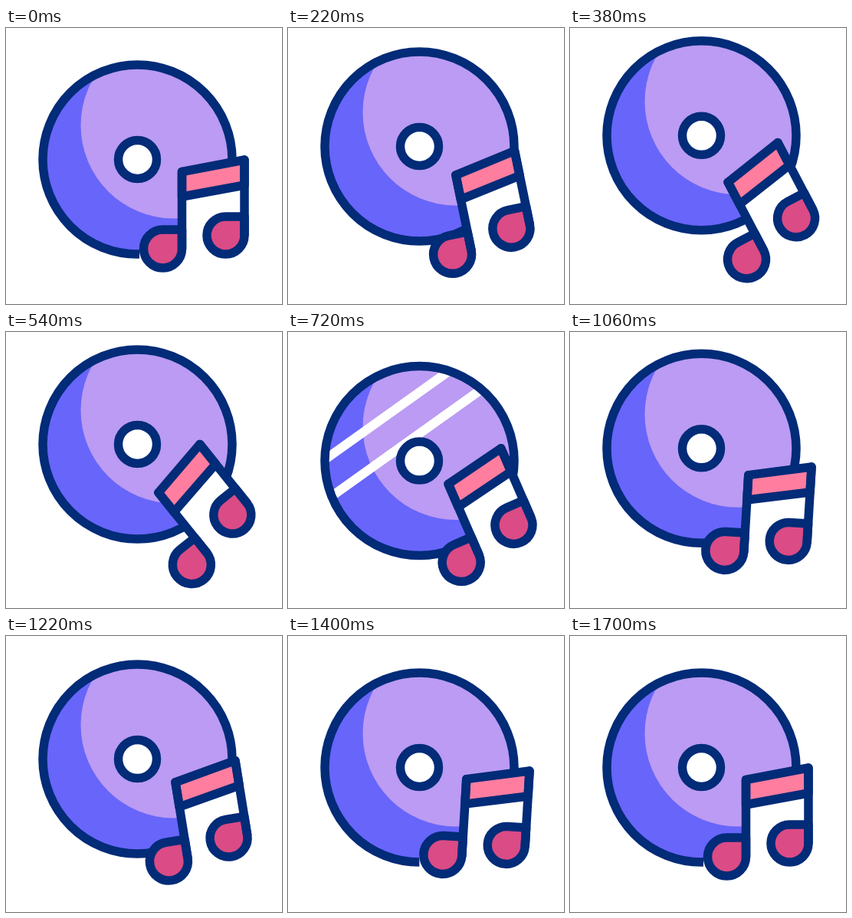
An HTML page that plays this animation: 360 px wide and 360 px high, repeating every 2 s.

```html
<!DOCTYPE html>
<html lang="en">
<head>
<meta charset="utf-8">
<title>Disc and note</title>
<style>
  html, body { margin: 0; width: 100%; height: 100%; overflow: hidden; background: #fff; }
  svg { display: block; width: 100%; height: 100%; }
  .line { stroke: #022b78; stroke-width: 11.5; stroke-linejoin: round; stroke-linecap: round; }
  .beam { fill: #ff7d9f; }
  .head { fill: #db4b85; }
</style>
</head>
<body>
<svg viewBox="0 0 360 360">
  <defs>
    <clipPath id="face"><circle cx="171.5" cy="171.5" r="123.5"/></clipPath>
  </defs>

  <g id="disc">
    <g clip-path="url(#face)">
      <circle cx="171.5" cy="171.5" r="124" fill="#6865fa"/>
      <circle cx="219" cy="127" r="121.5" fill="#bb9bf3"/>
      <g transform="translate(171.5 171.5) rotate(-35.5)">
        <g id="shine" fill="#fff">
          <rect x="-140" y="-28" width="280" height="12"/>
          <rect x="-140" y="16" width="280" height="12"/>
        </g>
      </g>
    </g>
    <circle class="line" cx="171.5" cy="171.5" r="123.5" fill="none"/>
    <circle class="line" cx="171.5" cy="171.5" r="25" fill="#fff"/>
  </g>

  <!-- white areas where the note cuts into the disc -->
  <rect id="notch" width="70" height="40" fill="#fff"/>

  <g id="note">
    <path d="M229.5 220L311 205V320H229.5Z" fill="#fff"/>
    <path class="line head" d="M229.5 263H204.5A25 25 0 1 0 229.5 288Z"/>
    <path class="line head" d="M311 246H286.5A24.5 24.5 0 1 0 311 270.5Z"/>
    <path class="line beam" d="M229.5 187.5L311 172V205L229.5 220Z"/>
    <path class="line" d="M229.5 187.5V288M311 172V270" fill="none"/>
  </g>
</svg>
<script>
  const LOOP = 2000;
  const PIVOT = { x: 245.5, y: 242 };
  const HEAD = { x: 204.5, y: 288, r: 30.5 };

  // [time in ms, value]
  const lift = [[0, 0], [425, -32], [800, 0], [1085, -20], [1375, 0]];
  const swing = [[0, 0], [610, -40], [925, 20], [1180, -10], [1460, 5], [1700, 0]];

  const [disc, shine, notch, note] =
    ['disc', 'shine', 'notch', 'note'].map(id => document.getElementById(id));

  const ease = p => (1 - Math.cos(Math.PI * p)) / 2;

  function valueAt(keys, t) {
    const i = keys.findIndex(k => k[0] > t);
    if (i < 0) return keys[keys.length - 1][1];
    const [t0, a] = keys[i - 1], [t1, b] = keys[i];
    return a + (b - a) * ease((t - t0) / (t1 - t0));
  }

  function draw(t) {
    const angle = valueAt(swing, t);
    const rad = angle * Math.PI / 180;
    const dx = HEAD.x - PIVOT.x, dy = HEAD.y - PIVOT.y;
    const hx = PIVOT.x + dx * Math.cos(rad) - dy * Math.sin(rad);
    const hy = PIVOT.y + dx * Math.sin(rad) + dy * Math.cos(rad);

    disc.setAttribute('transform', `translate(0 ${valueAt(lift, t)})`);
    shine.setAttribute('transform', `translate(0 ${(t - 809) * 0.58})`);
    notch.setAttribute('transform', `translate(${hx - HEAD.r} ${hy})`);
    note.setAttribute('transform', `rotate(${angle} ${PIVOT.x} ${PIVOT.y})`);
  }

  const start = performance.now();
  function tick() {
    draw((performance.now() - start) % LOOP);
    requestAnimationFrame(tick);
  }
  tick();
</script>
</body>
</html>
```
